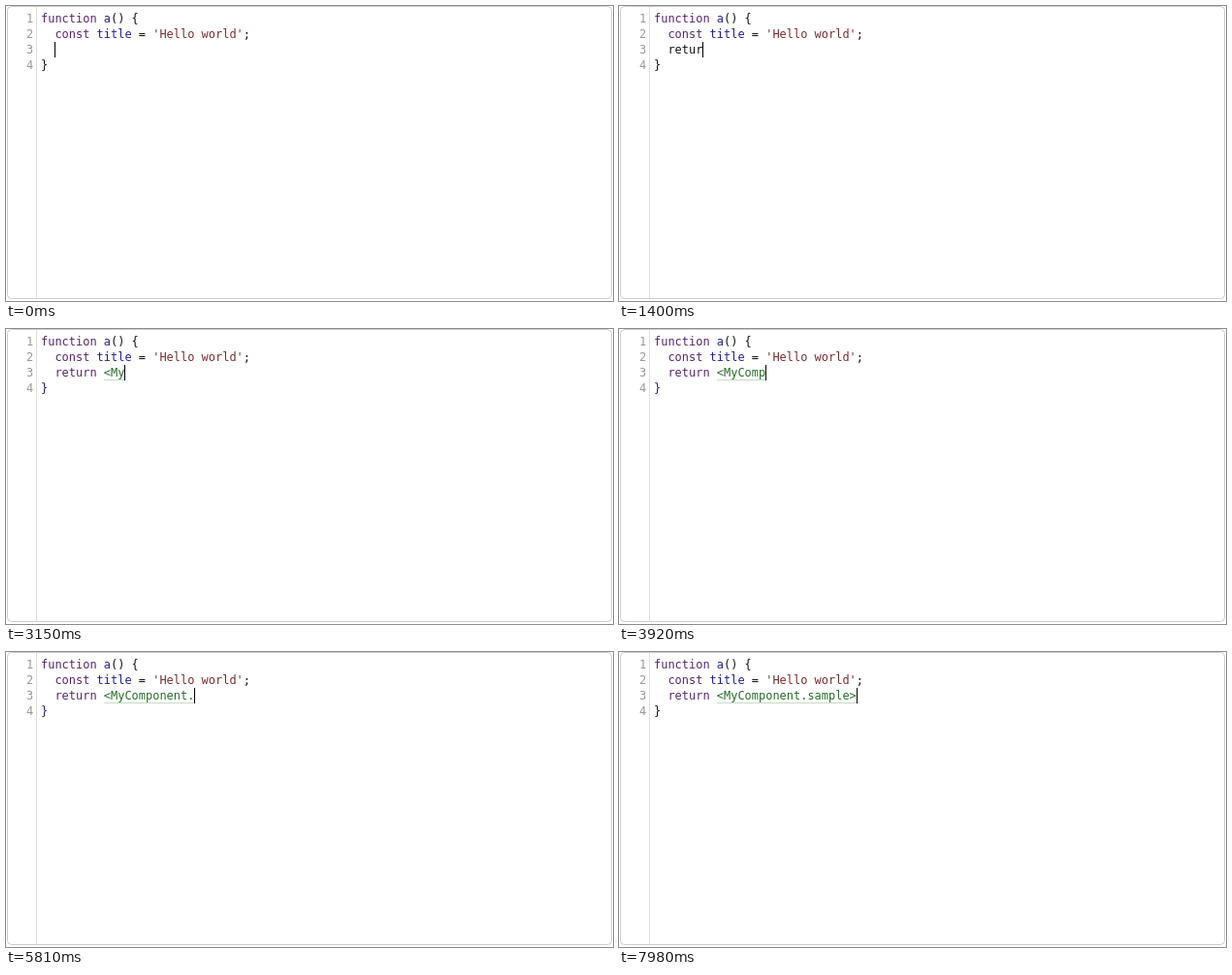
Recreate the animation shown at these times as an HTML page with a canvas. Size 626x304 px, loop 8000 ms.

```html
<!DOCTYPE html>
<html lang="en">
<head>
<meta charset="utf-8">
<title>Code editor</title>
<style>
  html, body { margin: 0; width: 100%; height: 100%; overflow: hidden; background: #fff; }
  canvas { display: block; }
</style>
</head>
<body>
<canvas id="stage" width="626" height="304"></canvas>
<script>
const ctx = document.getElementById('stage').getContext('2d');
const LOOP = 8000, CHAR = 7.2, LEFT = 36, LINE = 16, BASE = 17;
const KEYWORD = '#56266a', NAME = '#20209a', STRING = '#7a2c2c',
      TAG = '#266b26', PLAIN = '#111', ATTR = '#22226e';

const typed = 'return <MyComponent.sample>';
const tagStart = typed.indexOf('<');
// One key press time per character
const keys = [
  840, 980, 1120, 1190, 1330, 1470, 1610,
  2660, 2870, 3010,
  3290, 3500, 3710, 3850, 4060, 4200, 4340, 4480, 4620, 4720,
  6160, 6230, 6370, 6440, 6580, 6650, 6740
];
const BLINK = 530, FIRST_BLINK = -460;

const colX = col => LEFT + col * CHAR;

function write(text, col, row, color) {
  ctx.fillStyle = color;
  for (let i = 0; i < text.length; i++) {
    ctx.fillText(text[i], colX(col + i), BASE + row * LINE);
  }
}

function drawFrame() {
  ctx.fillStyle = '#fff';
  ctx.fillRect(0, 0, 626, 304);
  ctx.fillStyle = '#ddd';
  ctx.fillRect(31, 1, 1, 300);
  ctx.strokeStyle = '#ccc';
  ctx.lineWidth = 1;
  ctx.beginPath();
  ctx.roundRect(1.5, 0.5, 623, 301, 4);
  ctx.stroke();
}

function drawCode(count) {
  ctx.font = '11.96px "DejaVu Sans Mono", "Noto Sans Mono", monospace';
  ctx.fillStyle = '#999';
  for (let row = 0; row < 4; row++) {
    ctx.fillText(row + 1, 21, BASE + row * LINE);
  }
  write('function', 0, 0, KEYWORD);
  write('a', 9, 0, NAME);
  write('() {', 10, 0, PLAIN);
  write('const', 2, 1, KEYWORD);
  write('title', 8, 1, NAME);
  write('=', 14, 1, PLAIN);
  write("'Hello world'", 16, 1, STRING);
  write(';', 29, 1, PLAIN);

  const word = typed.slice(0, Math.min(count, 6));
  write(word, 2, 2, word === 'return' ? KEYWORD : PLAIN);

  const tag = typed.slice(tagStart, Math.max(count, tagStart));
  if (tag) {
    const x = Math.round(colX(2 + tagStart));
    ctx.fillStyle = '#c6dbc6';
    ctx.fillRect(x, 52, Math.round(tag.length * CHAR), 1);
    write(tag, 2 + tagStart, 2, TAG);
  }
  write('}', 0, 3, tag && !tag.endsWith('>') ? ATTR : PLAIN);
}

function drawCaret(t, count) {
  const last = count ? keys[count - 1] : FIRST_BLINK;
  if (Math.floor((t - last) / BLINK) % 2) return;
  ctx.fillStyle = '#000';
  ctx.fillRect(Math.round(colX(2 + count)), 37, 1, 16);
}

function render(now) {
  const t = now % LOOP;
  const count = keys.filter(k => k <= t).length;
  drawFrame();
  drawCode(count);
  drawCaret(t, count);
  requestAnimationFrame(render);
}

render(0);
</script>
</body>
</html>
```
